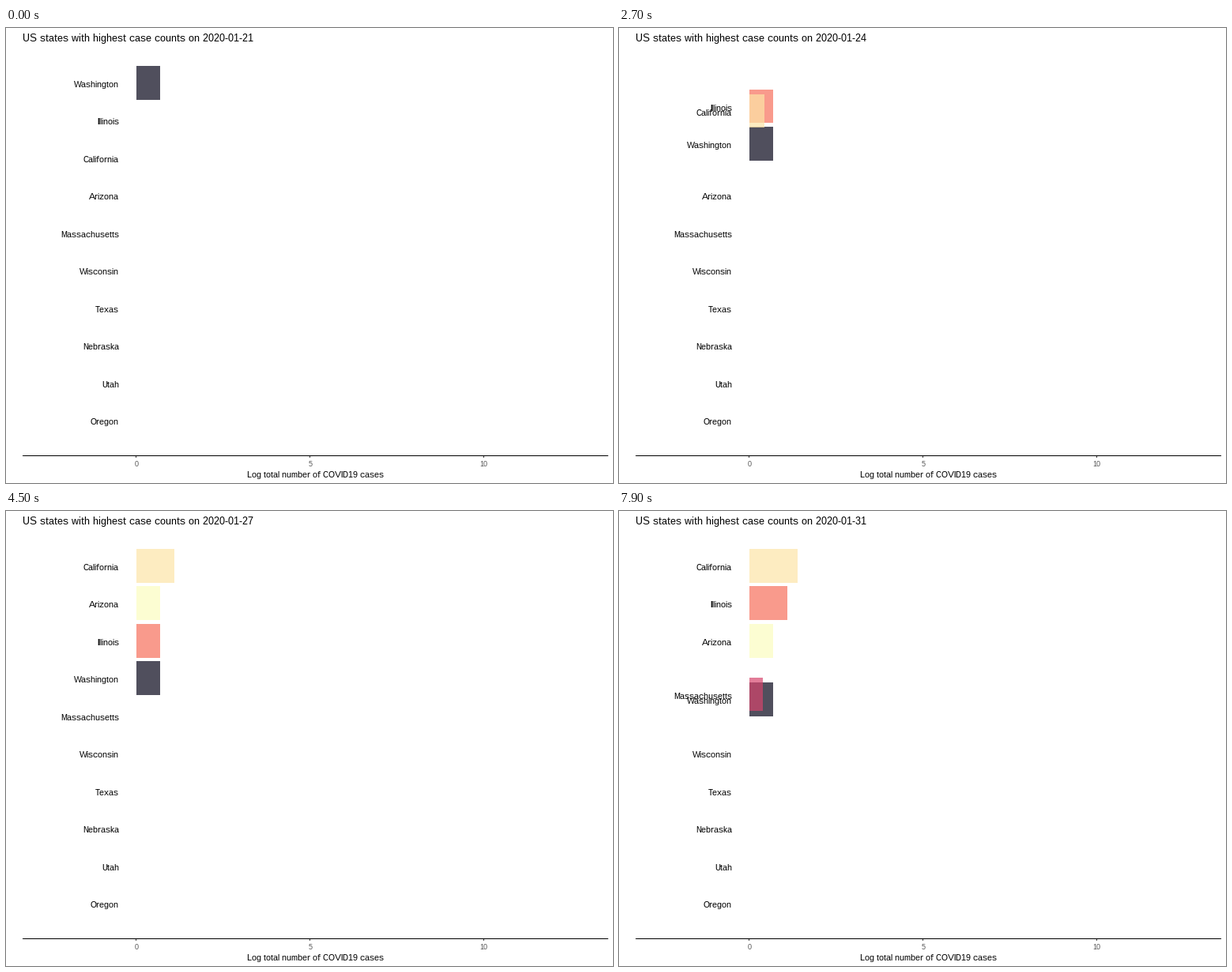
Write a matplotlib script that moves like this. It is 768 px wide and 576 px high and loops after 8 s.

```python
import numpy as np
import matplotlib.pyplot as plt
from matplotlib.animation import FuncAnimation
from matplotlib.patches import Rectangle

plt.rcParams.update({
    "font.family": "Liberation Sans",
    "text.hinting": "native",
    "text.hinting_factor": 1,
    "text.kerning_factor": 6,
})

W, H, DPI = 768, 576, 96
FRAMES, INTERVAL = 80, 100
PER_DAY = 7.5                    # frames per day
ZERO, UNIT = 164.9, 43.95        # x of zero, pixels per log unit
TOP, STEP, HALF = 69.3, 47.44, 21.35
BASELINE = 5.7                   # label baseline below the bar centre

STATES = ["Washington", "Illinois", "California", "Arizona", "Massachusetts",
          "Wisconsin", "Texas", "Nebraska", "Utah", "Oregon"]
SHADES = {"Washington": 0.045, "Illinois": 0.70, "California": 0.947,
          "Arizona": 1.0, "Massachusetts": 0.58}

L2, L3, L4 = np.log([2, 3, 4])
# day -> {state: (rank, log count)}, only what changes that day
CHANGES = {
    0: {"Washington": (0, L2)},
    3: {"Illinois": (0, L2), "Washington": (1, L2)},
    4: {"California": (0, L2), "Illinois": (1, L2), "Washington": (2, L2)},
    5: {"California": (0, L3), "Arizona": (1, L2),
        "Illinois": (2, L2), "Washington": (3, L2)},
    9: {"Illinois": (1, L3), "Arizona": (2, L2)},
    10: {"California": (0, L4)},
    11: {"Massachusetts": (3, L2), "Washington": (4, L2)},
}


def build_days():
    now = {s: (i, 0.0) for i, s in enumerate(STATES)}
    days = []
    for day in range(12):
        now = {**now, **CHANGES.get(day, {})}
        days.append(np.array([now[s] for s in STATES], float))
    return days


DAYS = build_days()
KEYS = [int(PER_DAY * d) for d in range(len(DAYS))]


def pose(frame):
    """Rank and value of every state, linear between daily key frames."""
    d = np.searchsorted(KEYS, frame, side="right") - 1
    t = (frame - KEYS[d]) / (KEYS[d + 1] - KEYS[d])
    return DAYS[d] * (1 - t) + DAYS[d + 1] * t


def px(v):
    return int(np.floor(v + 0.5))


fig = plt.figure(figsize=(W / DPI, H / DPI), dpi=DPI, facecolor="white")
ax = fig.add_axes([0, 0, 1, 1])
ax.set_xlim(0, W)
ax.set_ylim(H, 0)
ax.axis("off")


def box(x, y, w, h, color, **kw):
    return ax.add_patch(Rectangle((x, y), w, h, facecolor=color, linewidth=0,
                                  antialiased=False, **kw))


def label(x, y, text, size, ha="left", color="black"):
    return ax.text(x, y, text, fontsize=size * 72 / DPI, ha=ha,
                   va="baseline", color=color, zorder=3)


title = label(21, 17, "", 13)
box(21, 541, 741, 1, "black")
for tick in (0, 5, 10):
    x = ZERO + UNIT * tick
    box(int(x), 542, 1, 2, "#333333")
    label(x, 555, str(tick), 9, "center", "#4d4d4d")
label(391.5, 569, "Log total number of COVID19 cases", 11, "center")

magma = plt.get_cmap("magma")
bars = {s: box(px(ZERO), 0, 0, 0, magma(v), alpha=0.7, zorder=2)
        for s, v in SHADES.items()}
names = [label(143, 0, s, 11, "right") for s in STATES]


def update(frame):
    title.set_text("US states with highest case counts on "
                   f"2020-01-{21 + int(frame / PER_DAY)}")
    for state, name, (rank, value) in zip(STATES, names, pose(frame)):
        y = TOP + STEP * rank
        name.set_y(px(y + BASELINE))
        if state in bars:
            left, top = px(ZERO), px(y - HALF)
            width = px(ZERO + UNIT * value) - left
            bars[state].set_bounds(left, top, width, px(y + HALF) - top)
            bars[state].set_visible(width > 0)
    return [title, *names, *bars.values()]


anim = FuncAnimation(fig, update, frames=FRAMES, interval=INTERVAL,
                     repeat=True, repeat_delay=0, blit=False)
plt.show()
```
